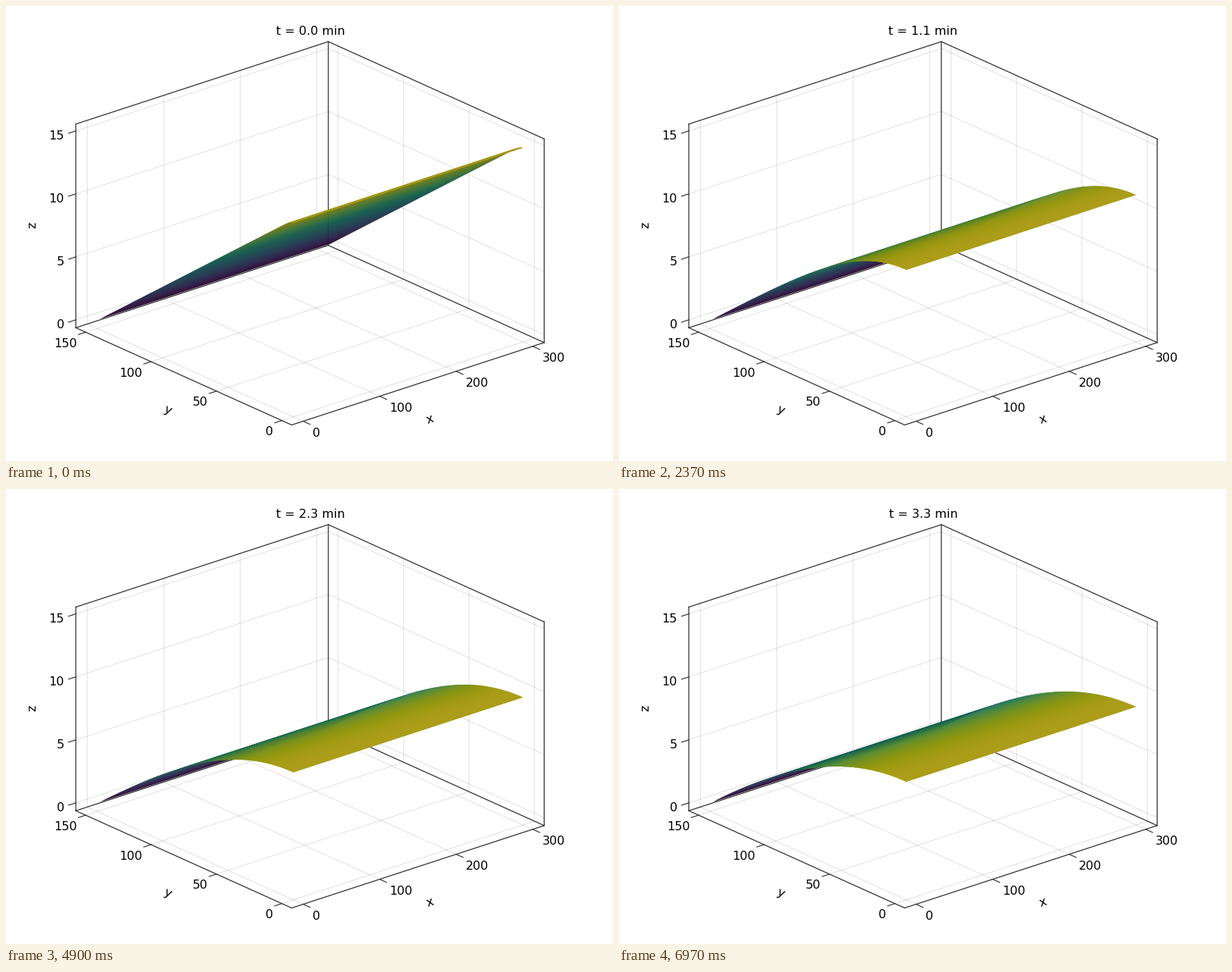
Write a matplotlib script that moves like this. It is 800x600 px and loops after 7.01 s.

```python
import math

import matplotlib.pyplot as plt
import numpy as np
from matplotlib.animation import FuncAnimation
from matplotlib.collections import LineCollection, PolyCollection

W, H, DPI = 800, 600, 100
FRAMES, LOOP_MS = 210, 7010
MINUTES = 200 / 60          # simulated time in one loop
PX = 72 / DPI               # points per pixel

# Axis limits and the screen vectors of the box edges
LO = np.array([-15, -7.5, -0.63])
HI = np.array([315, 157.5, 15.54])
ORIGIN = np.array([376.5, 552.5])
EDGES = np.array([[332.8, -108.7], [-284.5, -128.2], [0, -268.6]])
UNIT = EDGES / (HI - LO)[:, None]

LENGTH, TOE, SLOPE = 150, 147.75, 0.1
DIFFUSION = 17.4            # per frame
RIDGE_SLOPE = 0.081         # steeper parts show their underside

plt.rcParams["font.family"] = "DejaVu Sans"
plt.rcParams["font.size"] = 16 * PX

fig = plt.figure(figsize=(W / DPI, H / DPI), dpi=DPI, facecolor="white")
ax = fig.add_axes([0, 0, 1, 1])
ax.set(xlim=(0, W), ylim=(H, 0))
ax.axis("off")


def project(x, y, z):
    p = np.stack(np.broadcast_arrays(x, y, z), axis=-1) - LO
    return ORIGIN + p @ UNIT


def add_lines(segments, color, width, zorder):
    ax.add_collection(LineCollection(segments, colors=color, linewidths=width * PX,
                                     capstyle="projecting", snap=False, zorder=zorder))


def unit(v):
    return v / np.hypot(*v)


def draw_box():
    (x0, y0, z0), (x1, y1, z1) = LO, HI
    xs, ys, zs = range(0, 301, 100), range(0, 151, 50), range(0, 16, 5)

    grid = []
    for x in xs:
        grid.append(project(x, [y0, y1, y1], [z0, z0, z1]))
    for y in ys:
        grid.append(project([x0, x1, x1], y, [z0, z0, z1]))
    for z in zs:
        grid.append(project([x0, x1, x1], [y1, y1, y0], z))
    add_lines(grid, (0, 0, 0, 0.12), 1, 1)

    spines = [project([x0, x1, x1], [y1, y1, y0], z) for z in (z0, z1)]
    spines.append(project([x0, x0, x1], [y1, y0, y0], z0))
    spines += [project(x, y, [z0, z1]) for x, y in ((x0, y1), (x1, y1), (x1, y0))]
    add_lines(spines, "#2a2a2a", 1.2, 2)

    along_x, along_y = unit(EDGES[0]), unit(EDGES[1])
    ticks = []

    def tick(value, point, direction, offset, align):
        ticks.append([point, point + 10 * direction])
        tx, ty = point + offset
        ax.text(tx, ty + 5.8, str(value), ha=align, va="baseline")

    for x in xs:
        tick(x, project(x, y0, z0), -along_y, (12.3, 14.7), "left")
    for y in ys:
        tick(y, project(x0, y, z0), -along_x, (-11.6, 13.8), "right")
    for z in zs:
        tick(z, project(x0, y1, z), -along_x, (-15, 5.3), "right")
    add_lines(ticks, "#2a2a2a", 1.1, 2)

    for name, x, y, angle in (("x", 560.4, 549.2, 18), ("y", 211.2, 537.5, -24),
                              ("z", 39.4, 288.6, 90)):
        ax.text(x, y, name, rotation=angle, rotation_mode="anchor",
                ha="center", va="baseline")


@np.vectorize
def ierfc(a):
    return math.exp(-a * a) / math.sqrt(math.pi) - a * math.erfc(a)


def profile(y, i):
    """Height of the diffusing wedge across the slope."""
    s = math.sqrt(DIFFUSION * i + 4)
    drop = ierfc(y / (2 * s)) - ierfc((2 * LENGTH - y) / (2 * s))
    lift = 2 * ierfc(LENGTH / (2 * s)) * (1 - (y / LENGTH) ** 5)
    return SLOPE * (LENGTH - y) - 2 * SLOPE * s * (drop - lift)


Y = np.linspace(TOE, 0, 150)        # far to near
VIRIDIS = plt.get_cmap("viridis")
START = np.arange(len(Y) - 1)
STOP = np.minimum(START + 2, len(Y) - 1)    # overlap the next strip to hide seams


def strips(i):
    z = profile(Y, i)
    near, far = project(0, Y, z), project(300, Y, z)
    quads = np.stack([near[START], near[STOP], far[STOP], far[START]], axis=1)

    slope = np.diff(z) / -np.diff(Y)
    tilt = 1 / np.sqrt(1 + (6.8 * slope) ** 2)
    light = np.where(slope > RIDGE_SLOPE, 0.2 + 0.4 * tilt, 0.08 + 0.6 * tilt)
    level = ((z[:-1] + z[1:]) / 2 - z.min()) / (z.max() - z.min())
    colors = VIRIDIS(level)
    colors[:, :3] *= light[:, None]
    return quads, colors


draw_box()
surface = PolyCollection([], linewidths=0, edgecolors="none", zorder=3)
ax.add_collection(surface)
title = ax.text(401, 38.5, "", ha="center", va="baseline")


def update(i):
    quads, colors = strips(i)
    surface.set_verts(quads)
    surface.set_facecolor(colors)
    title.set_text(f"t = {MINUTES * i / FRAMES:.1f} min")
    return surface, title


anim = FuncAnimation(fig, update, frames=FRAMES, interval=LOOP_MS / FRAMES,
                     repeat=True, repeat_delay=0)
plt.show()
```
